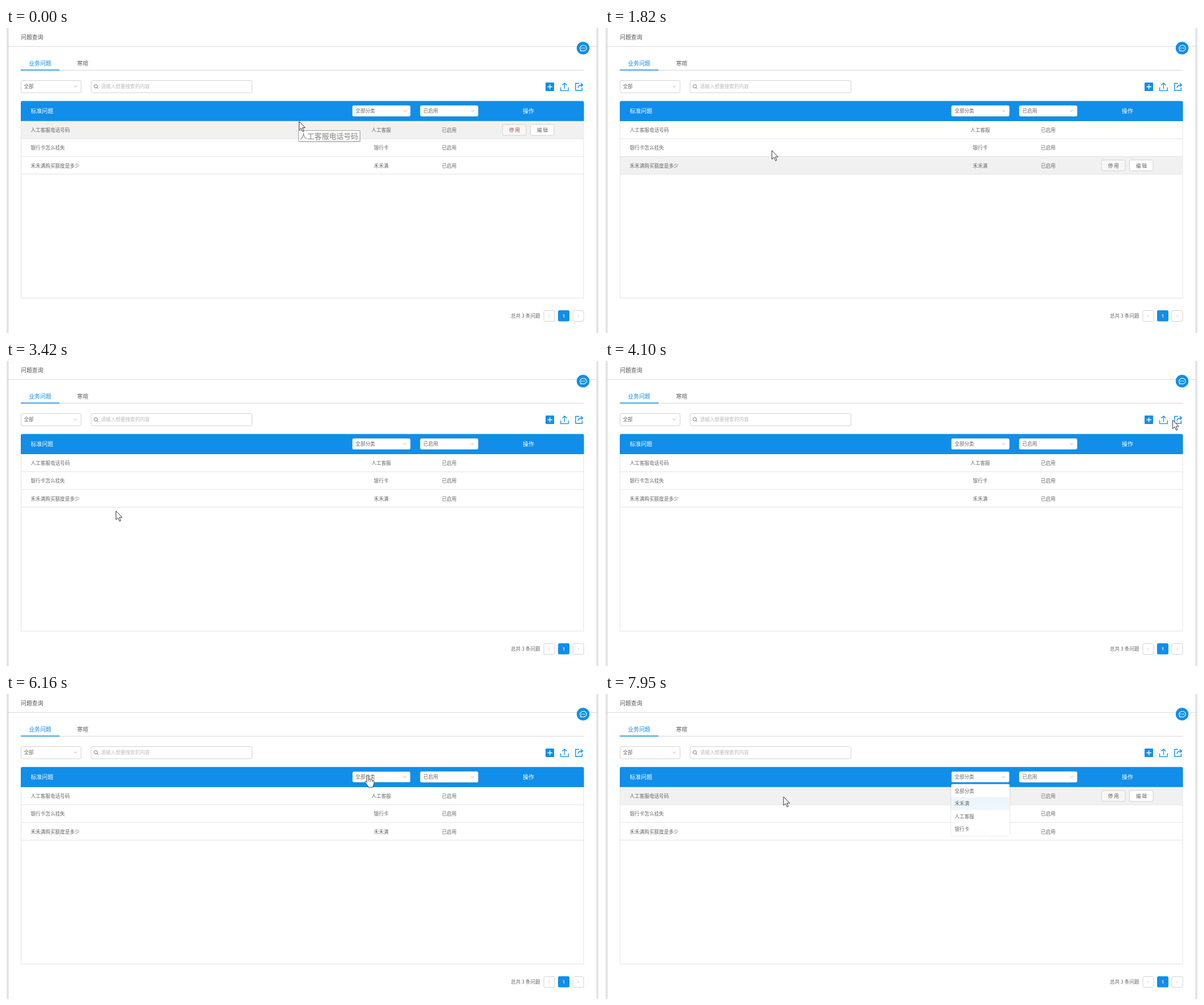
These frames come from a looping animation (1043x537 px, 8 s). An HTML page:

```html
<!DOCTYPE html>
<html lang="zh">
<head>
<meta charset="utf-8">
<style>
html, body { margin: 0; width: 100%; height: 100%; overflow: hidden; background: #fff; }
svg { display: block; font-family: "Noto Sans CJK SC", "Noto Sans CJK", sans-serif; }
</style>
</head>
<body>
<script>
const BLUE = '#108ee9', LOOP = 8000, STEP = 70;
const ROW_TOP = 163.8, ROW_H = 31.17, OPTION_H = 22.6;
const MENU_OPEN = 6440, MENU_CLOSE = 7840;

// Static building blocks; text is placed by its vertical centre.
const text = (x, cy, s, { size = 8.6, fill = '#666', anchor = 'start', extra = '' } = {}) =>
  `<text x="${x}" y="${cy + size * 0.37}" font-size="${size}" fill="${fill}" text-anchor="${anchor}" ${extra}>${s}</text>`;
const mid = (x, cy, s, opt) => text(x, cy, s, { anchor: 'middle', ...opt });
const rect = (x, y, w, h, fill, extra = '') =>
  `<rect x="${x}" y="${y}" width="${w}" height="${h}" fill="${fill}" ${extra}/>`;
const box = (x, y, w, h, extra = '', fill = '#fff') =>
  rect(x, y, w, h, fill, `rx="2.5" stroke="#d2d2d2" ${extra}`);
const line = (d, color, width = 1) =>
  `<path d="${d}" fill="none" stroke="${color}" stroke-width="${width}"/>`;
const chevron = (x, y, id = '') =>
  `<g transform="translate(${x} ${y})"><path ${id && `id="${id}"`} d="M-2.7-1.4L0 1.4 2.7-1.4" fill="none" stroke="#b5b5b5"/></g>`;
const headSelect = (x, label, boxId, arrowId) =>
  box(x, 136.5, 101.8, 19, `stroke-width=".7" id="${boxId}"`) + text(x + 5.5, 146.3, label) + chevron(x + 92, 146, arrowId);

const rows = [['人工客服电话号码', '人工客服'], ['银行卡怎么挂失', '银行卡'], ['禾禾满购买额度是多少', '禾禾满']];
const options = ['全部分类', '禾禾满', '人工客服', '银行卡'];

document.body.innerHTML = `<svg width="1043" height="537" viewBox="0 0 1043 537">
${rect(0, 0, 1043, 537, '#f0f0f0')}
${rect(3.5, -2, 1036, 541, '#fff', 'stroke="#c4c4c4"')}
${line('M4 32.5H1039', '#dcdcdc')}
${text(26, 16.5, '问题查询', { size: 9.9, fill: '#555' })}

<circle cx="1015" cy="35.4" r="11.2" fill="${BLUE}"/>
${line('M1010.5 40.3L1011 38.6A5.8 4.9 0 1 1 1013.3 40Z', '#fff', 1.1)}
${[-1, 0, 1].map(i => `<circle cx="${1015 + i * 2.7}" cy="35.3" r=".9" fill="#fff"/>`).join('')}

${line('M26 74.3H1016', '#d4d4d4')}
${line('M26 74H94', BLUE, 1.6)}
${mid(60, 62.5, '业务问题', { size: 9.9, fill: BLUE })}
${mid(135, 62.5, '寒暄', { size: 9.9 })}

${box(26.5, 92.5, 105.5, 21.5)}${text(31.5, 103, '全部')}${chevron(122, 103)}
${box(149.8, 92.5, 283, 21.5, 'id="search"')}
<circle cx="157.8" cy="102.6" r="3" fill="none" stroke="#777"/>${line('M160 104.8L162.2 107', '#777')}
${text(167, 103.2, '请输入想要搜索的内容', { fill: '#bbb' })}

${rect(949, 96, 15, 15, BLUE, 'rx="1"')}${line('M952.5 103.5H961M956.6 99.3V107.8', '#fff', 1.4)}
${line('M975.6 104.5V110.4H989.2V104.5M982.4 107V97M978.5 100.8L982.4 96.9 986.3 100.8', BLUE, 1.3)}
${line('M1008 97.5H1001.8V109.8H1013.4V105M1006 105.5Q1006.5 100.2 1013.5 100.2M1010.8 97L1014.4 100.2 1010.8 103.4', BLUE, 1.4)}

${rect(26.5, 140, 989.5, 335.5, '#fff', 'stroke="#e4e4e4"')}
<path d="M26 164V131.5Q26 128.5 29 128.5H1013.5Q1016.5 128.5 1016.5 131.5V164Z" fill="${BLUE}"/>
${text(43.5, 146.7, '标准问题', { size: 9.9, fill: '#fff' })}
${mid(919, 146.7, '操作', { size: 9.9, fill: '#fff' })}
${headSelect(609.3, '全部分类', 'category', 'arrow')}
${headSelect(728.6, '已启用', 'state', 'stateArrow')}

<rect id="hover" x="27" y="${ROW_TOP}" width="989" height="${ROW_H}" fill="#f1f1f1"/>
${rows.map(([question, kind], i) => {
  const y = ROW_TOP + i * ROW_H, cy = y + 16.2;
  return text(43.5, cy, question) + mid(660, cy, kind) + mid(779.5, cy, '已启用')
    + line(`M27 ${y + ROW_H}H1016`, '#e0e0e0', 0.9);
}).join('')}
<g id="buttons">
${box(873.5, 170, 41.5, 19, '', '#f7f7f7')}${mid(894.3, 180, '停 用', { extra: 'id="stop"' })}
${box(922.5, 170, 41.5, 19)}${mid(943.5, 180, '编 辑')}
</g>

${text(888, 507, '总共 3 条问题')}
${box(946, 497.5, 19, 19)}${box(997, 497.5, 19, 19)}
${line('M956.7 504.8L954.3 507 956.7 509.2M1005.3 504.8L1007.7 507 1005.3 509.2', '#ccc')}
${rect(971, 497, 20, 19.6, BLUE, 'rx="2.5"')}
${mid(981, 507.2, '1', { size: 8, fill: '#fff', extra: 'font-family="Open Sans, sans-serif" font-weight="600"' })}

<g id="menu">
${rect(609, 158.6, 102.7, 90.9, '#fff', 'rx="2.5" style="filter:drop-shadow(0 .5px 1.5px #0003)"')}
<rect id="pick" x="609" width="102.7" height="${OPTION_H}" fill="#ecf6fd"/>
${options.map((s, i) => text(615, 170.5 + i * OPTION_H, s)).join('')}
</g>

<g id="tip">
${rect(516.5, 182.5, 107, 19, '#0003')}
${rect(514.5, 180.5, 108, 19, '#fff', 'stroke="#8a8a8a"')}
${text(517, 190.2, rows[0][0], { size: 12.8, fill: '#606060' })}
</g>

<g id="cursor" stroke-linejoin="round">
<path id="pointer" d="M.5.5V15.7L4 12.4 6.8 18.4 9 17.4 6.4 11.6H11.2Z" fill="#fff" stroke="#333"/>
<path id="beam" d="M-4.5-7.5H-1.5L0-6.5 1.5-7.5H4.5M0-6.5V6.5M-4.5 7.5H-1.5L0 6.5 1.5 7.5H4.5" fill="none" stroke="#111" stroke-width="1.7"/>
<path id="hand" d="M-1.6 12.5V1.6Q-1.6 0 0 0T1.6 1.6V7Q4.3 5.8 5 7.8 7.5 6.7 8.3 8.6 10.8 8 10.8 10.5V14.5Q10.5 17 9.3 18.5V21H.5V19Q-1.5 17.5-4.8 11.8-5 9.5-3 10.2ZM1.6 7V11M5 8V11M8.3 9V12" fill="#fff" stroke="#333" stroke-width=".9"/>
</g>
</svg>`;

const $ = Object.fromEntries([...document.querySelectorAll('[id]')].map(e => [e.id, e]));
const clamp = v => Math.max(0, Math.min(1, v));
const smooth = k => k * k * (3 - 2 * k);

// Counterclockwise ellipse; 0 degrees is at the right.
const orbit = (cx, cy, rx, ry, deg) => {
  const a = deg * Math.PI / 180;
  return [cx + rx * Math.cos(a), cy - ry * Math.sin(a)];
};

// One wide sweep, then a narrowing spiral that slows to rest.
const SPIRAL_START = 1000, SLOWDOWN = 2800, SPIRAL_END = 3420;
function circling(t) {
  if (t <= 140) return [515, 164];
  if (t < SPIRAL_START) return orbit(650, 125, 326, 58, 246 + (t - 140) * 0.375);
  t = Math.min(t, SPIRAL_END);
  const late = Math.max(0, t - SLOWDOWN);
  const turned = t - SLOWDOWN - late ** 2 / (2 * (SPIRAL_END - SLOWDOWN));
  return orbit(212, 215.5, 95 - (t - 1400) * 0.033, 62, 90 + turned * 0.459);
}

// Eased moves after the circling; bend bows the path downwards.
const glides = [
  { from: 3480, to: 4060, x: 998, y: 103.5 },
  { from: 4340, to: 5180, x: 279, y: 103, bend: 28 },
  { from: 5460, to: 6300, x: 665, y: 141, bend: 10 },
  { from: 6440, to: 6860, x: 663, y: 183.5 },
  { from: 7000, to: 7210, x: 656, y: 190 },
  { from: 7630, to: 7910, x: 313.5, y: 180.5 }
];
const cursorAt = t => glides.reduce(([x, y], g) => {
  const k = clamp((t - g.from) / (g.to - g.from)), e = smooth(k);
  return [x + (g.x - x) * e, y + (g.y - y) * e + (g.bend || 0) * Math.sin(Math.PI * k)];
}, circling(t));

const inside = ([x, y], l, t, r, b) => x >= l && x <= r && y >= t && y <= b;
const onMenu = (p, t) => t >= MENU_OPEN && inside(p, 609, 156, 712, 250);
const show = (el, on) => el.setAttribute('visibility', on ? 'visible' : 'hidden');

// Row highlighting trails the cursor by one refresh.
const rowAt = t => {
  const p = cursorAt(t - STEP);
  return inside(p, 26, ROW_TOP, 1016, 257) && !onMenu(p, t) ? Math.floor((p[1] - ROW_TOP) / ROW_H) : -1;
};

function draw(t) {
  const p = cursorAt(t), row = rowAt(t), tipShown = t < 210;
  show($.hover, row >= 0);
  show($.buttons, row >= 0);
  if (row >= 0) {
    const shift = `translate(0 ${row * ROW_H})`;
    $.hover.setAttribute('transform', shift);
    $.buttons.setAttribute('transform', shift);
    let held = 0;
    while (held < 4 && rowAt(t - (held + 1) * STEP) === row) held++;
    const k = tipShown ? 0.45 : (held / 4) ** 3;
    $.stop.setAttribute('fill', `rgb(${90 + 150 * k},${90 - 25 * k},${90 - 38 * k})`);
  }

  show($.tip, tipShown);
  $.tip.setAttribute('opacity', t < STEP ? 0.75 : 1);

  const onSearch = inside(p, 149, 92, 433, 114), onCategory = inside(p, 609, 136, 712, 156);
  const hand = onCategory || onMenu(p, t);
  $.search.setAttribute('stroke', onSearch ? '#3da2ee' : '#d2d2d2');
  $.category.setAttribute('stroke', onCategory || t >= MENU_OPEN ? '#49a9ee' : '#d2d2d2');

  const opening = clamp((t - MENU_OPEN) / 210), closing = clamp((t - MENU_CLOSE) / 210) ** 4;
  const grown = 1 - (1 - opening) ** 3 - closing;
  show($.menu, t >= MENU_OPEN);
  $.menu.setAttribute('opacity', grown);
  $.menu.setAttribute('transform', `translate(0 159) scale(1 ${0.8 + 0.2 * grown}) translate(0 -159)`);
  $.pick.setAttribute('y', 159 + (t >= 7630 ? OPTION_H : 0));
  $.arrow.setAttribute('transform', `scale(1 ${t < MENU_CLOSE ? 1 - 2 * opening : 1})`);

  $.cursor.setAttribute('transform', `translate(${p})`);
  show($.beam, onSearch);
  show($.hand, hand);
  show($.pointer, !onSearch && !hand);
}

(function loop() {
  const t = performance.now() % LOOP;
  draw(Math.floor(t / STEP) * STEP);
  requestAnimationFrame(loop);
})();
</script>
</body>
</html>
```
